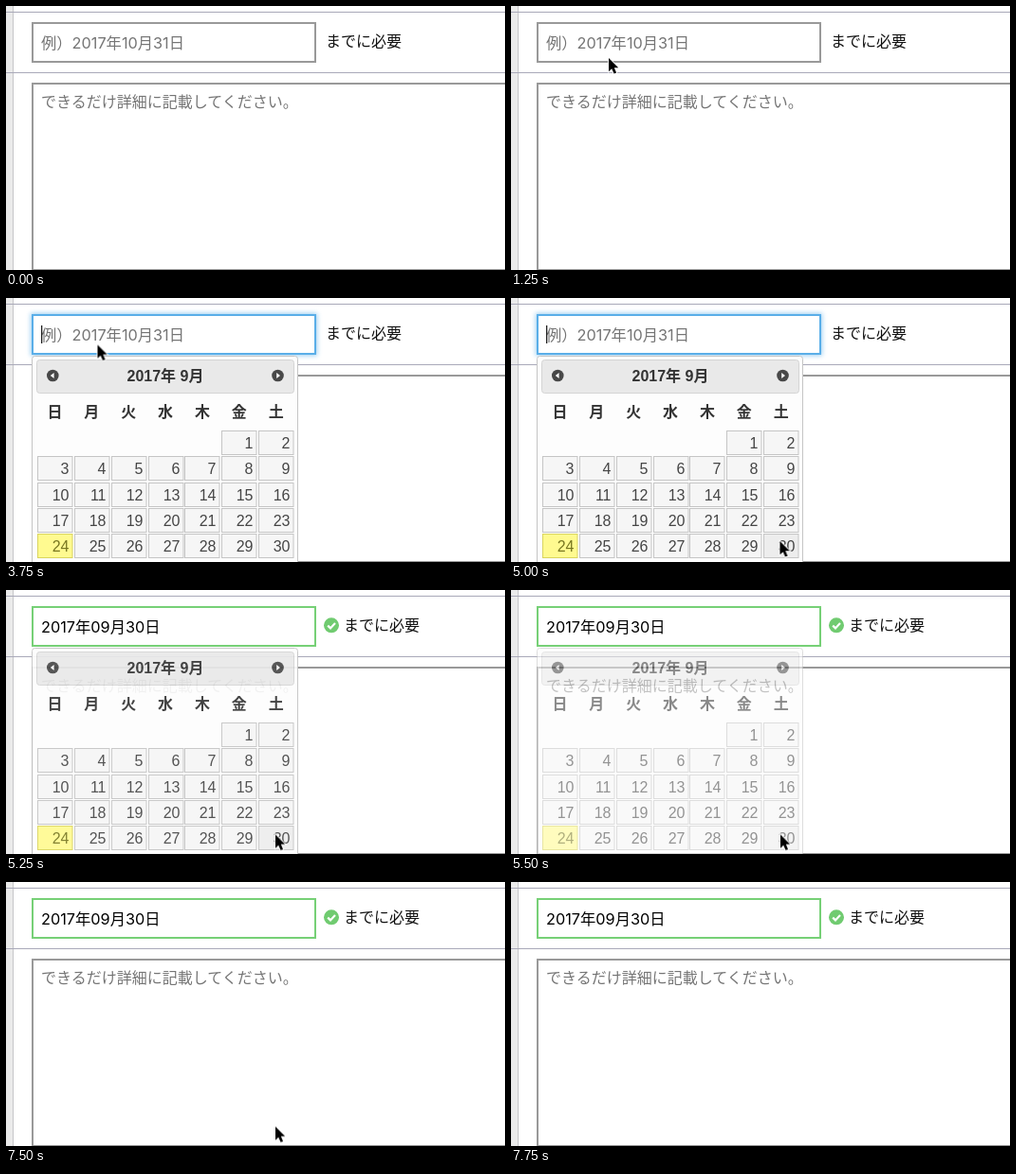
Animation, 526 px wide and 279 px high, one loop 8.75 s. Source, as an HTML page:

```html
<!DOCTYPE html>
<html lang="ja">
<head>
<meta charset="utf-8">
<title>日付入力</title>
<style>
html, body { margin: 0; width: 100%; height: 100%; overflow: hidden; background: #fff; }
svg { display: block; width: 526px; height: 279px; }
text { font: 16px Inter, "Noto Sans CJK JP", "Noto Sans CJK", sans-serif; fill: #111; }
.hint { fill: #757575; }
.date { font-size: 16.3px; }
.done { fill: #000; }
.box { fill: #fff; stroke: #999; stroke-width: 2; }
.calendar text { font-family: "Liberation Sans", "Noto Sans CJK JP", "Noto Sans CJK", sans-serif; }
.title, .weekday { font-weight: 700; text-anchor: middle; fill: #333; }
.day rect { fill: #f6f6f6; stroke: #c5c5c5; }
.day text { text-anchor: end; fill: #454545; }
.day.today rect { fill: #fffa90; stroke: #dad55e; }
.day.today text { fill: #777620; }

/* Every change is a hard step on one shared 8750 ms loop. */
.empty, .done, .label, .field, .glow, .caret, .calendar, .pointer, .d7 rect, .d30 rect {
  animation: 8750ms step-end infinite;
}
.empty { animation-name: empty; }
.done { animation-name: done; }
.label { animation-name: label; }
.field { animation-name: field; }
.glow { animation-name: glow; }
.caret { animation-name: caret; }
.calendar { animation-name: calendar; }
.pointer { animation-name: pointer; }
.d7 rect { animation-name: hover7; }
.d30 rect { animation-name: hover30; }

@keyframes empty { 0% { opacity: 1; } 60%, 100% { opacity: 0; } }
@keyframes done { 0% { opacity: 0; } 60%, 100% { opacity: 1; } }
@keyframes label { 0% { transform: none; } 60%, 100% { transform: translateX(19px); } }
@keyframes field {
  0% { stroke: #999; }
  42.857% { stroke: #5aaee8; }
  60%, 100% { stroke: #76d076; }
}
@keyframes glow { 0% { opacity: 0; } 42.857% { opacity: .6; } 60%, 100% { opacity: 0; } }
@keyframes caret {
  0% { opacity: 0; }
  42.857% { opacity: 1; }
  48.571% { opacity: 0; }
  54.285% { opacity: 1; }
  60%, 100% { opacity: 0; }
}
@keyframes calendar {
  0% { opacity: 0; }
  42.857% { opacity: 1; }
  60% { opacity: .92; }
  62.857% { opacity: .58; }
  65.714%, 100% { opacity: 0; }
}
@keyframes hover7 { 0% { fill: #f6f6f6; } 54.285% { fill: #ededed; } 57.142%, 100% { fill: #f6f6f6; } }
@keyframes hover30 { 0% { fill: #f6f6f6; } 57.142%, 100% { fill: #ededed; } }
@keyframes pointer {
  0% { opacity: 0; transform: translate(115px, 33px); }
  11.428% { opacity: 1; transform: translate(115px, 33px); }
  14.285% { opacity: 1; transform: translate(103px, 55px); }
  22.857% { opacity: 1; transform: translate(98px, 50px); }
  25.714% { opacity: 1; transform: translate(96.5px, 49.5px); }
  48.571% { opacity: 1; transform: translate(193px, 166px); }
  51.428% { opacity: 1; transform: translate(208px, 181px); }
  54.285% { opacity: 1; transform: translate(287px, 244px); }
  57.142% { opacity: 1; transform: translate(283.5px, 257px); }
  60% { opacity: 1; transform: translate(284px, 258.5px); }
  88.571%, 100% { opacity: 0; transform: translate(284px, 258.5px); }
}
</style>
</head>
<body>
<svg viewBox="0 0 526 279">
  <defs>
    <filter id="soft" x="-10%" y="-50%" width="120%" height="200%">
      <feGaussianBlur stdDeviation="2.5"/>
    </filter>
  </defs>

  <rect width="7" height="279" fill="#ebebeb"/>
  <rect x="7" width="1" height="279" fill="#c6c6c8"/>
  <path d="M0 6.5H526M0 70.5H526" stroke="#a9a9b9"/>

  <rect class="glow" x="26" y="16" width="302" height="45" fill="#5aaee8" filter="url(#soft)"/>
  <rect class="box field" x="28" y="18" width="298" height="41"/>
  <text class="date hint empty" x="37" y="44.5">例）2017年10月31日</text>
  <text class="date done" x="37" y="44.5">2017年09月30日</text>
  <rect class="caret" x="37" y="29" width="1.3" height="19" fill="#222"/>

  <g class="done">
    <circle cx="343" cy="37.3" r="8" fill="#70cb70"/>
    <path d="M339.2 37.6l2.8 2.8 5-5.4" fill="none" stroke="#fff" stroke-width="2.2"/>
  </g>
  <text class="label" x="337" y="43">までに必要</text>

  <rect class="box" x="28" y="82" width="520" height="197"/>
  <text class="hint" x="37" y="107">できるだけ詳細に記載してください。</text>

  <g class="calendar">
    <rect x="27.5" y="61.5" width="280" height="230" rx="3" fill="#fdfdfd" stroke="#c5c5c5"/>
    <rect x="32.5" y="65.5" width="271" height="35" rx="3" fill="#e9e9e9" stroke="#d4d4d4"/>
    <text class="title" x="168" y="88">2017年 9月</text>
    <g fill="#484848">
      <circle cx="49.3" cy="82" r="6.3"/>
      <circle cx="286.5" cy="82" r="6.3"/>
    </g>
    <path d="M50.6 79v6l-3.8-3zM285.2 79v6l3.8-3z" fill="#fff"/>
    <g id="month"></g>
  </g>

  <path class="pointer" d="M0 0V14.2L3.2 11.2 5.6 16.6 8.1 15.5 5.8 10.3H10.2Z"
        fill="#000" stroke="#fff" stroke-width="1.6" paint-order="stroke"/>
</svg>
<script>
const month = document.getElementById('month');
const columnX = column => 33 + column * 38.87;
const FIRST_COLUMN = 5, DAYS = 30, TODAY = 24;

function add(parent, tag, attributes, text = '') {
  const node = document.createElementNS(parent.namespaceURI, tag);
  for (const [name, value] of Object.entries(attributes)) node.setAttribute(name, value);
  node.textContent = text;
  return parent.appendChild(node);
}

[...'日月火水木金土'].forEach((name, column) =>
  add(month, 'text', { class: 'weekday', x: columnX(column) + 18.5, y: 126 }, name));

for (let day = 1; day <= DAYS; day++) {
  const slot = day - 1 + FIRST_COLUMN;
  const x = Math.round(columnX(slot % 7)) + .5;
  const y = Math.round(140 + Math.floor(slot / 7) * 27.3) + .5;
  const cell = add(month, 'g', { class: `day d${day}${day === TODAY ? ' today' : ''}` });
  add(cell, 'rect', { x, y, width: 36.5, height: 25 });
  add(cell, 'text', { x: x + 33, y: y + 18 }, day);
}
</script>
</body>
</html>
```
